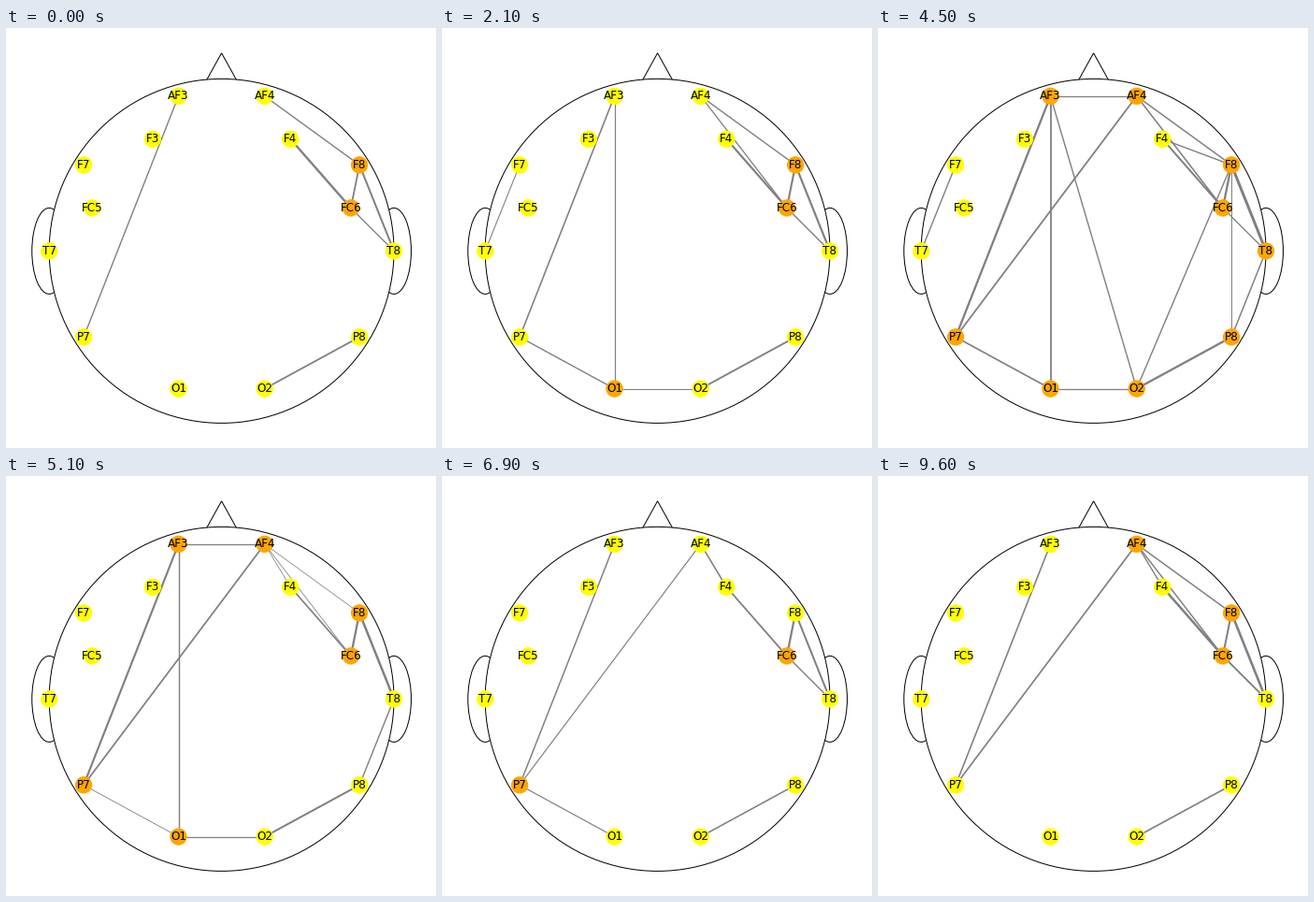
A matplotlib script that plays this animation: 460 px wide and 449 px high, repeating every 9.9 s.

```python
import numpy as np
import matplotlib.pyplot as plt
from matplotlib.animation import FuncAnimation
from matplotlib.patches import Ellipse, Polygon

W, H, DPI = 460, 449, 64
PT = 72 / DPI  # points per pixel
FRAMES, STEP = 33, 300
CX, CY, UX, UY = 230.6, 238.4, 46.1, 46.0
CUTOFF, HUB_DEGREE = 0.7, 3

# Electrodes in head units; the right side mirrors the left
PAIRS = [("AF3", "AF4", 1, 3.6), ("F3", "F4", 1.6, 2.6), ("F7", "F8", 3.2, 2),
         ("FC5", "FC6", 3, 1), ("T7", "T8", 4, 0), ("P7", "P8", 3.2, -2),
         ("O1", "O2", 1, -3.2)]

# Link strengths at key steps; unlisted links are zero there
KEYS = {
    0: dict(AF3_P7=1.4, AF4_F8=1.4, F4_FC6=2.4, F8_FC6=1.8, F8_T8=2.0,
            FC6_T8=1.3, O2_P8=1.8),
    4: dict(AF3_P7=1.5, AF4_F8=1.5, AF4_FC6=1.4, F4_FC6=2.4, F8_FC6=2.2,
            F8_T8=2.5, FC6_T8=1.4, F8_P8=1.0, T8_P8=1.5, O2_P8=1.9),
    7: dict(AF3_P7=1.6, AF4_F8=1.4, AF4_FC6=1.3, F4_FC6=2.2, F8_FC6=2.1,
            F8_T8=2.2, FC6_T8=1.4, O2_P8=1.9, F7_T7=1.1, P7_O1=1.4,
            AF3_O1=1.2, O1_O2=1.1),
    11: dict(AF4_F4=2.0, AF4_F8=1.5, AF4_FC6=1.5, F4_F8=1.4, F4_FC6=2.4,
             F8_FC6=2.0, F8_T8=2.0, FC6_T8=1.4, P7_O1=1.4, O2_P8=1.8),
    15: dict(AF3_AF4=1.3, AF3_P7=2.3, AF3_O1=1.8, AF3_O2=1.4, AF4_P7=1.8,
             AF4_F8=1.5, AF4_FC6=1.6, F4_F8=1.4, F4_FC6=2.0, F8_FC6=2.3,
             F8_T8=3.0, FC6_T8=1.3, F8_P8=1.0, F8_O2=1.4, T8_P8=1.5,
             O2_P8=2.3, O1_O2=1.3, P7_O1=1.7, F7_T7=1.4),
    19: dict(AF3_AF4=1.3, AF3_P7=2.0, AF3_O1=1.1, AF4_P7=1.7, AF4_F4=1.5,
             F4_FC6=1.4, F8_FC6=2.2, F8_T8=2.0, T8_P8=1.3, O2_P8=1.7,
             O1_O2=1.2),
    23: dict(AF3_P7=1.5, AF4_P7=1.2, P7_O1=1.2, AF4_F4=1.6, F4_FC6=1.8,
             F8_FC6=2.2, F8_T8=2.0, FC6_T8=1.4, O2_P8=1.6),
    27: dict(AF4_F4=1.5, F4_F8=1.4, F4_FC6=2.1, F8_FC6=2.2, F8_T8=2.2,
             FC6_T8=1.9, P7_O1=1.5, O2_P8=1.5),
    28: dict(AF4_F4=1.5, AF4_F8=1.3, AF4_FC6=1.2, F4_F8=1.2, F4_FC6=2.1,
             F8_FC6=2.2, F8_T8=2.2, FC6_T8=1.8, P7_O1=1.4, O2_P8=1.5),
    30: dict(AF3_P7=1.4, AF4_P7=1.4, P7_O1=1.2, AF4_F4=1.4, AF4_F8=1.5,
             AF4_FC6=1.4, F4_FC6=2.3, F8_FC6=2.1, F8_T8=2.4, FC6_T8=1.8,
             T8_P8=1.2, O2_P8=1.6),
    32: dict(AF3_P7=1.6, AF4_P7=1.7, AF4_F4=1.4, AF4_F8=1.5, AF4_FC6=1.5,
             F4_FC6=2.5, F8_FC6=2.0, F8_T8=2.6, FC6_T8=1.9, O2_P8=1.7),
}


def place(x, y):
    return CX + UX * x, CY - UY * y


pos = {}
for left, right, x, y in PAIRS:
    pos[left], pos[right] = place(-x, y), place(x, y)

fig = plt.figure(figsize=(W / DPI, H / DPI), dpi=DPI, facecolor="white")
ax = fig.add_axes([0, 0, 1, 1])
ax.set_xlim(0, W)
ax.set_ylim(H, 0)
ax.axis("off")


def outline(shape, z):
    shape.set(facecolor="white", edgecolor="black", linewidth=PT, zorder=z)
    ax.add_patch(shape)


for side in (-4, 4):
    outline(Ellipse(place(side, 0), 0.8 * UX, 2 * UY), 1)
outline(Polygon([place(-0.36, 3.95), place(0, 4.6), place(0.36, 3.95)]), 1)
outline(Ellipse((CX, CY), 8 * UX, 8 * UY), 2)

names = sorted({link for key in KEYS.values() for link in key})
links = {}
for name in names:
    a, b = name.split("_")
    line, = ax.plot(*zip(pos[a], pos[b]), color="gray", zorder=3,
                    solid_capstyle="butt")
    levels = [key.get(name, 0) for key in KEYS.values()]
    links[name] = line, levels

dots = ax.scatter(*zip(*pos.values()), s=300 * PT**2, linewidths=PT, zorder=4)
for name, (x, y) in pos.items():
    ax.text(x, y, name, fontsize=12 * PT, family="DejaVu Sans",
            ha="center", va="center", zorder=5)


def draw(i):
    degree = dict.fromkeys(pos, 0)
    for name, (line, levels) in links.items():
        w = np.interp(i, list(KEYS), levels)
        line.set_visible(w > CUTOFF)
        line.set_linewidth(w * PT)
        if w > CUTOFF:
            for end in name.split("_"):
                degree[end] += 1
    colors = ["orange" if d >= HUB_DEGREE else "yellow" for d in degree.values()]
    dots.set_facecolor(colors)
    dots.set_edgecolor(colors)
    return [dots]


anim = FuncAnimation(fig, draw, frames=FRAMES, interval=STEP,
                     repeat=True, repeat_delay=0)
plt.show()
```
